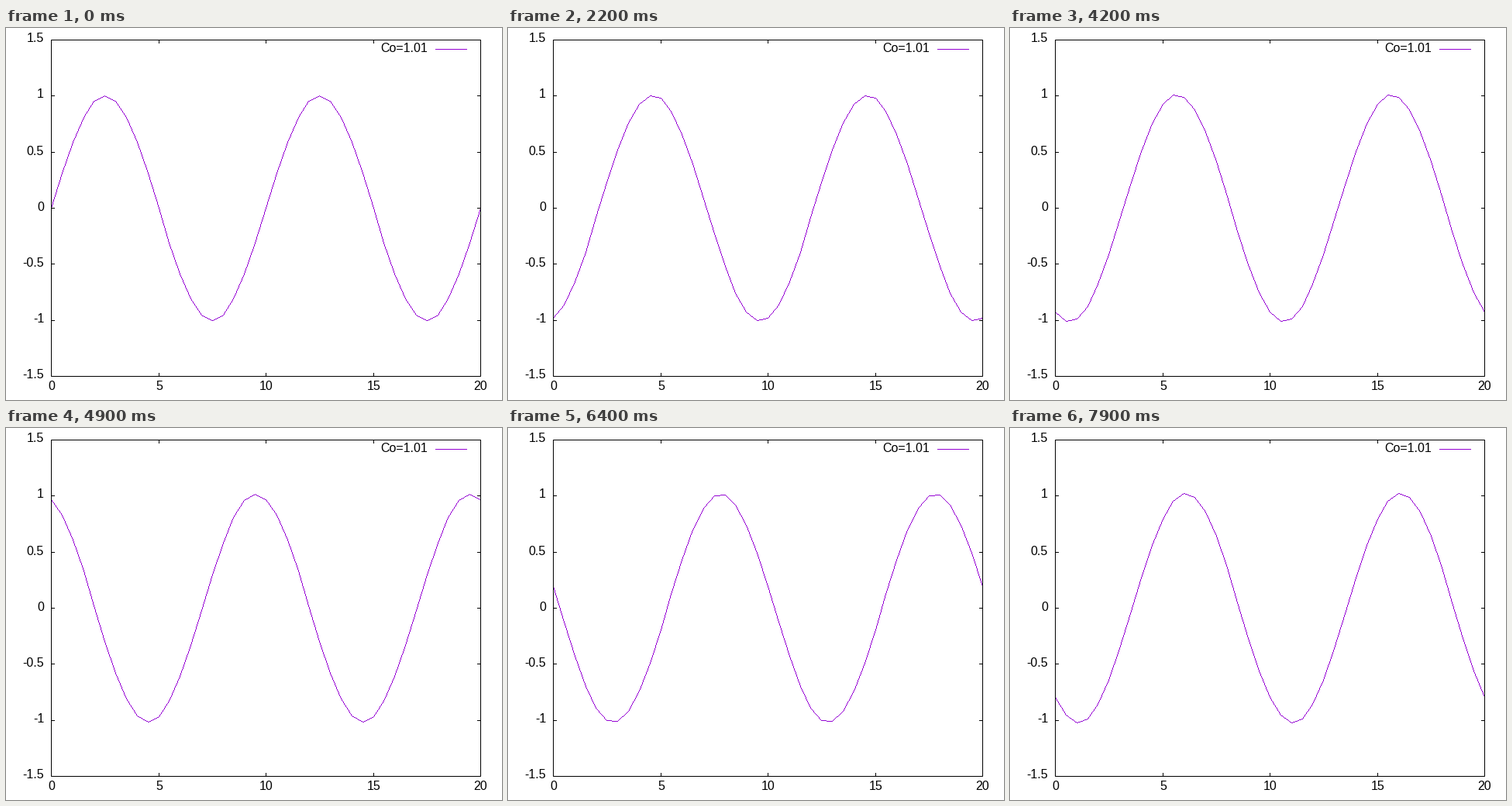
A matplotlib script that plays this animation: 640x480 px, repeating every 8 s.

```python
import numpy as np
import matplotlib.pyplot as plt
from matplotlib.animation import FuncAnimation
from matplotlib.patches import Rectangle

W, H, DPI = 640, 480, 100
FRAMES, INTERVAL = 80, 100
LEFT, RIGHT, TOP, BOTTOM = 58, 612, 15, 449
TICK = 5
PX = 72 / DPI       # one pixel in points
SHIFT = 0.5516      # distance travelled per frame
GROWTH = 0.00027    # relative amplitude gain per frame
PURPLE = (148, 0, 211)

plt.rcParams["font.family"] = "Liberation Sans"


def to_pixel(v):
    return np.floor(np.asarray(v) + 0.5).astype(int)


def px(x):
    return to_pixel(LEFT + (RIGHT - LEFT) * np.asarray(x) / 20)


def py(y):
    return to_pixel((TOP + BOTTOM) / 2 - (BOTTOM - TOP) * np.asarray(y) / 3)


fig = plt.figure(figsize=(W / DPI, H / DPI), dpi=DPI, facecolor="white")
ax = fig.add_axes([0, 0, 1, 1])
ax.axis("off")


def hline(x0, x1, y, color="black"):
    ax.plot([x0, x1], [y + 0.5] * 2, color=color, lw=PX,
            solid_capstyle="butt", snap=False, zorder=3)


def vline(x, y0, y1):
    ax.plot([x + 0.5] * 2, [y0, y1], color="black", lw=PX,
            solid_capstyle="butt", snap=False, zorder=3)


def label(x, y, text, ha):
    ax.text(x, y, text, ha=ha, va="baseline", fontsize=16 * PX, color="black")


def draw_curve(xs, ys):
    """White layer with a one-pixel, unsmoothed polyline."""
    layer = np.full((H, W, 3), 255, np.uint8)
    for x0, y0, x1, y1 in zip(xs, ys, xs[1:], ys[1:]):
        n = max(abs(x1 - x0), abs(y1 - y0)) + 1
        cols = to_pixel(np.linspace(x0, x1, n))
        rows = to_pixel(np.linspace(y0, y1, n))
        layer[rows, cols] = PURPLE
    return layer


grid = np.linspace(0, 20, 41)


def wave(n):
    amp = np.exp(GROWTH * n)
    u = amp * np.sin(2 * np.pi * (grid - SHIFT * n) / 10)
    return draw_curve(px(grid), py(u))


curve = ax.imshow(wave(0), extent=(0, W, H, 0), aspect="auto",
                  interpolation="nearest", zorder=0)

ax.add_patch(Rectangle((LEFT + 0.5, TOP + 0.5), RIGHT - LEFT, BOTTOM - TOP,
                       fill=False, ec="black", lw=PX, joinstyle="miter",
                       snap=False, zorder=3))

for v in range(0, 21, 5):
    x = px(v)
    if 0 < v < 20:
        vline(x, TOP, TOP + TICK)
        vline(x, BOTTOM + 1 - TICK, BOTTOM + 1)
    label(x + 0.5, 467, str(v), "center")

for v in np.arange(-1.5, 1.6, 0.5):
    y = py(v)
    if abs(v) < 1.5:
        hline(LEFT, LEFT + TICK, y)
        hline(RIGHT + 1 - TICK, RIGHT + 1, y)
    label(49, y + 3.5, f"{v:g}", "right")

label(544, 31, "Co=1.01", "right")
hline(554, 595, 27, color=np.array(PURPLE) / 255)

ax.set_xlim(0, W)
ax.set_ylim(H, 0)


def update(n):
    curve.set_data(wave(n))
    return (curve,)


anim = FuncAnimation(fig, update, frames=FRAMES, interval=INTERVAL,
                     init_func=lambda: update(0), repeat=True, repeat_delay=0)
plt.show()
```
